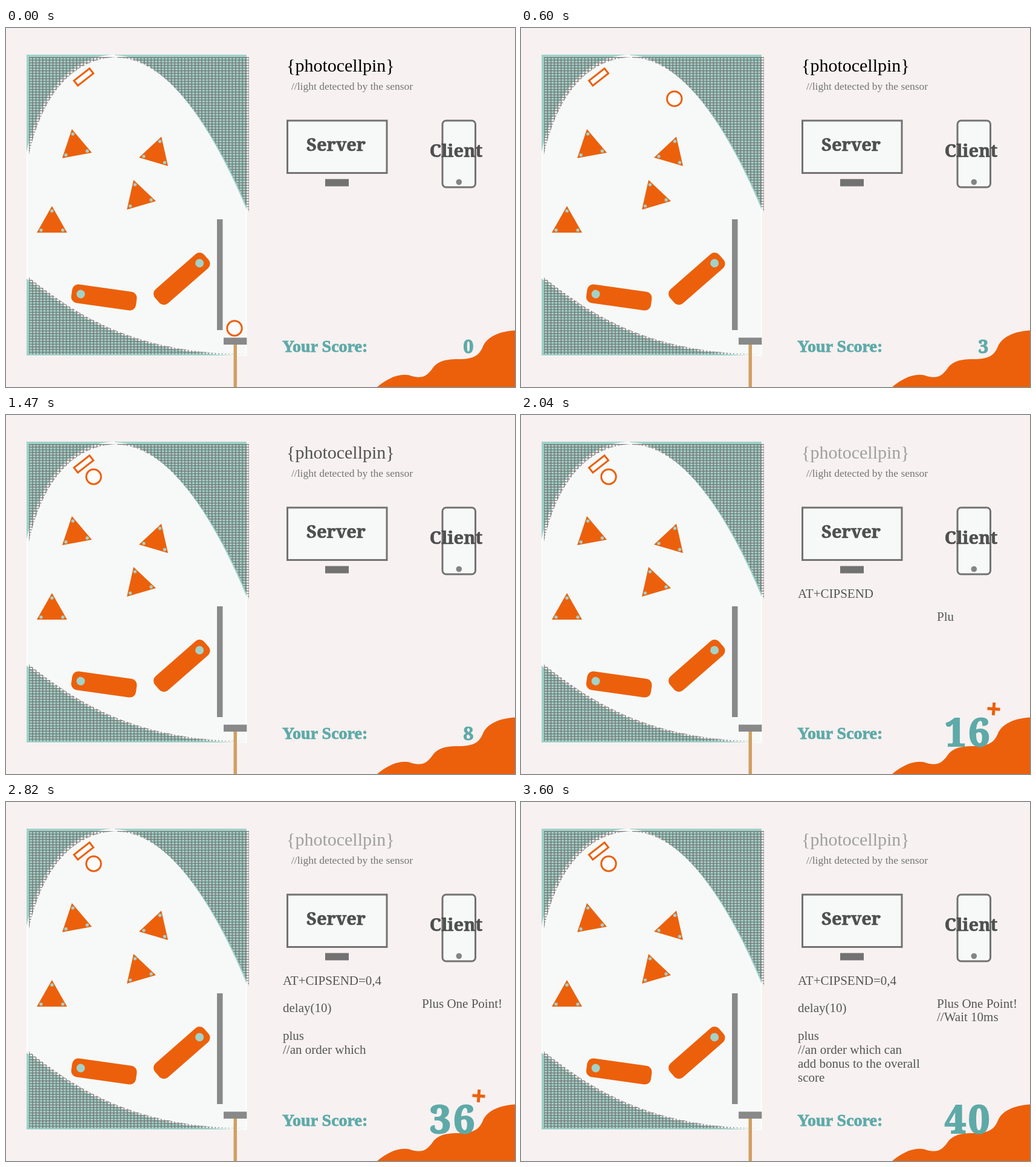
Write an HTML page that moves like this. It is 842 px wide and 593 px high and loops after 5400 ms.

```html
<!DOCTYPE html>
<html lang="en">
<head>
<meta charset="utf-8">
<title>Pinball score</title>
<style>
html, body { margin: 0; width: 100%; height: 100%; overflow: hidden; background: #f7f1f1; }
svg { display: block; width: 100vw; height: 100vh; }
text { font-family: "Liberation Serif", serif; white-space: pre; }
.slab { font: 700 29px "Noto Serif", serif; fill: #4f4f50; stroke: #4f4f50; stroke-width: .7; text-anchor: middle; }
.code { font-size: 21px; fill: #555; }
.orange { fill: #ec600c; }
.mint { fill: #a3d2c9; }
.teal { fill: #5eaaa8; stroke: #5eaaa8; }
.ring { fill: #fdfdfd; stroke: #ec600c; stroke-width: 3; }
.device { fill: #f6f9f8; stroke: #737272; stroke-width: 3; }
#score { font-family: "Noto Serif", serif; font-weight: 900; stroke-width: .035em; letter-spacing: .06em; }
</style>
</head>
<body>
<svg id="stage" viewBox="0 0 842 593">
  <defs>
    <pattern id="grid" width="5.6" height="4.4" patternUnits="userSpaceOnUse">
      <path d="M0 .7H5.6M.7 0V4.4" stroke="#757472" stroke-width="1.4"/>
    </pattern>
    <path id="top" d="M34 44H180C110 46 58 100 34 205ZM180 44H398V300C340 160 262 46 180 45Z"/>
    <path id="low" d="M34 414C112 476 212 541 398 541H34Z"/>
    <g id="flipper">
      <rect class="orange" x="-54" y="-15.5" width="108" height="31" rx="10"/>
      <circle class="mint" cx="-39" r="7"/>
    </g>
  </defs>

  <rect x="34" y="44" width="364.5" height="497.5" fill="#fff"/>
  <rect x="35.5" y="46" width="361" height="494" fill="#f6f9f8"/>
  <g fill="#9fd3c9"><use href="#top"/><use href="#low"/></g>
  <g fill="url(#grid)">
    <use href="#top" x="4" y="4"/>
    <use href="#low" x="4" y="-2"/>
  </g>

  <g id="bumpers"></g>
  <use href="#flipper" transform="translate(162.2 445) rotate(8)"/>
  <use href="#flipper" transform="translate(290.8 414.2) rotate(138.8)"/>
  <rect class="ring" x="-16.3" y="-5.2" width="32.6" height="10.4" transform="translate(128.5 81) rotate(-38)"/>
  <rect x="376.5" y="522" width="5.5" height="71" fill="#d0a060"/>
  <g fill="#898989">
    <rect x="349" y="316" width="9.5" height="183"/>
    <rect x="360" y="511.5" width="38.3" height="11.5"/>
  </g>
  <path id="track" fill="none" d="M378 496V310C352 240 308 143 254 117C222 101 180 90 145 102"/>
  <circle id="ball" class="ring" r="12.2"/>

  <text id="pin" x="464" y="72" font-size="30">{photocellpin}</text>
  <text x="472" y="101.5" font-size="17.5" fill="#757474">//light detected by the sensor</text>
  <rect class="device" x="465.5" y="153" width="164.5" height="86.5"/>
  <rect x="528" y="249.5" width="39" height="12" fill="#737272"/>
  <rect class="device" x="722" y="153" width="54.5" height="110" rx="6"/>
  <circle cx="749.3" cy="254.5" r="4.8" fill="#858484"/>
  <text class="slab" x="546" y="203">Server</text>
  <text class="slab" x="744.5" y="213">Client</text>

  <path class="orange" d="M614 593C629 581 647 570 667 573.5C685 580 695 577 705 563C713 551 726 546.5 750 547C773 547 783 541 789 526C795 511 815 501 842 499.5V593Z"/>
  <text class="teal" x="457" y="534.5" font-size="28" font-weight="700" stroke-width=".8">Your Score:</text>
  <text id="score" class="teal" text-anchor="end"></text>
  <path id="plus" d="M-10.5 0H10.5M0 -10.5V10.5" stroke="#ec600c" stroke-width="5" transform="translate(782 485.5) rotate(4)"/>
</svg>
<script>
const LOOP = 5400, STEP = 30;
const $ = id => document.getElementById(id);
const clamp = v => Math.max(0, Math.min(1, v));

function add(parent, tag, attrs) {
  const el = document.createElementNS("http://www.w3.org/2000/svg", tag);
  for (const k in attrs) el.setAttribute(k, attrs[k]);
  return parent.appendChild(el);
}

// Triangles with a dot set in from each corner
const bumpers = [
  [[109, 167], [142, 206], [93, 215]],
  [[257, 179.5], [268, 228], [220, 214]],
  [[211, 251], [248, 286], [200, 300]],
  [[76, 294], [101, 338], [51, 338]]
];
for (const tri of bumpers) {
  add($("bumpers"), "polygon", { class: "orange", points: tri.join(" ") });
  const mid = [0, 1].map(i => (tri[0][i] + tri[1][i] + tri[2][i]) / 3);
  for (const p of tri) {
    const [cx, cy] = p.map((v, i) => v + (mid[i] - v) * .28);
    add($("bumpers"), "circle", { class: "mint", cx, cy, r: 2.7 });
  }
}

// Typed blocks: an empty string is a blank line
function typer(x, y, pace, lines) {
  const rows = lines.map((s, i) => add($("stage"), "text", { class: "code", x, y: y + i * 22.9 }));
  return t => {
    let left = Math.max(0, Math.floor((t - 1800) / pace));
    lines.forEach((s, i) => {
      rows[i].textContent = s.slice(0, left);
      left = Math.max(0, left - s.length);
    });
  };
}
const typers = [
  typer(458, 301.5, 23.6, ["AT+CIPSEND=0,4", "", "delay(10)", "", "plus",
    "//an order which can", "add bonus to the overall", "score"]),
  typer(688, 339.5, 67.5, ["Plus One Point!", "//Wait 10ms"])
];

const scoreKeys = [[0, 0], [1460, 8], [1800, 10], [2040, 16.3], [2490, 27.3], [2820, 36.3], [2960, 40]];
function scoreAt(t) {
  const i = scoreKeys.findIndex(k => k[0] > t);
  if (i < 0) return 40;
  const [t0, a] = scoreKeys[i - 1], [t1, b] = scoreKeys[i];
  return Math.floor(a + (b - a) * (t - t0) / (t1 - t0));
}

const track = $("track"), length = track.getTotalLength();

function draw(t) {
  const run = 1 - Math.pow(1 - clamp(t / 1140), 2.08);
  const p = track.getPointAtLength(run * length);
  $("ball").setAttribute("cx", p.x);
  $("ball").setAttribute("cy", p.y);

  const grey = Math.round(160 * clamp((t - 1110) / 690));
  $("pin").setAttribute("fill", `rgb(${grey},${grey},${grey})`);

  const grow = clamp((t - 1590) / 300), score = $("score");
  score.textContent = scoreAt(t);
  score.setAttribute("x", 775 + 4 * grow);
  score.setAttribute("y", 536.5 + 10 * grow);
  score.style.fontSize = 30 + 33 * grow + "px";
  $("plus").style.display = t >= 1830 && t < 2970 ? "" : "none";

  for (const type of typers) type(t);
}

let start;
function tick(now) {
  start ??= now;
  const t = (now - start) % LOOP;
  draw(t - t % STEP);
  requestAnimationFrame(tick);
}
draw(0);
requestAnimationFrame(tick);
</script>
</body>
</html>
```
